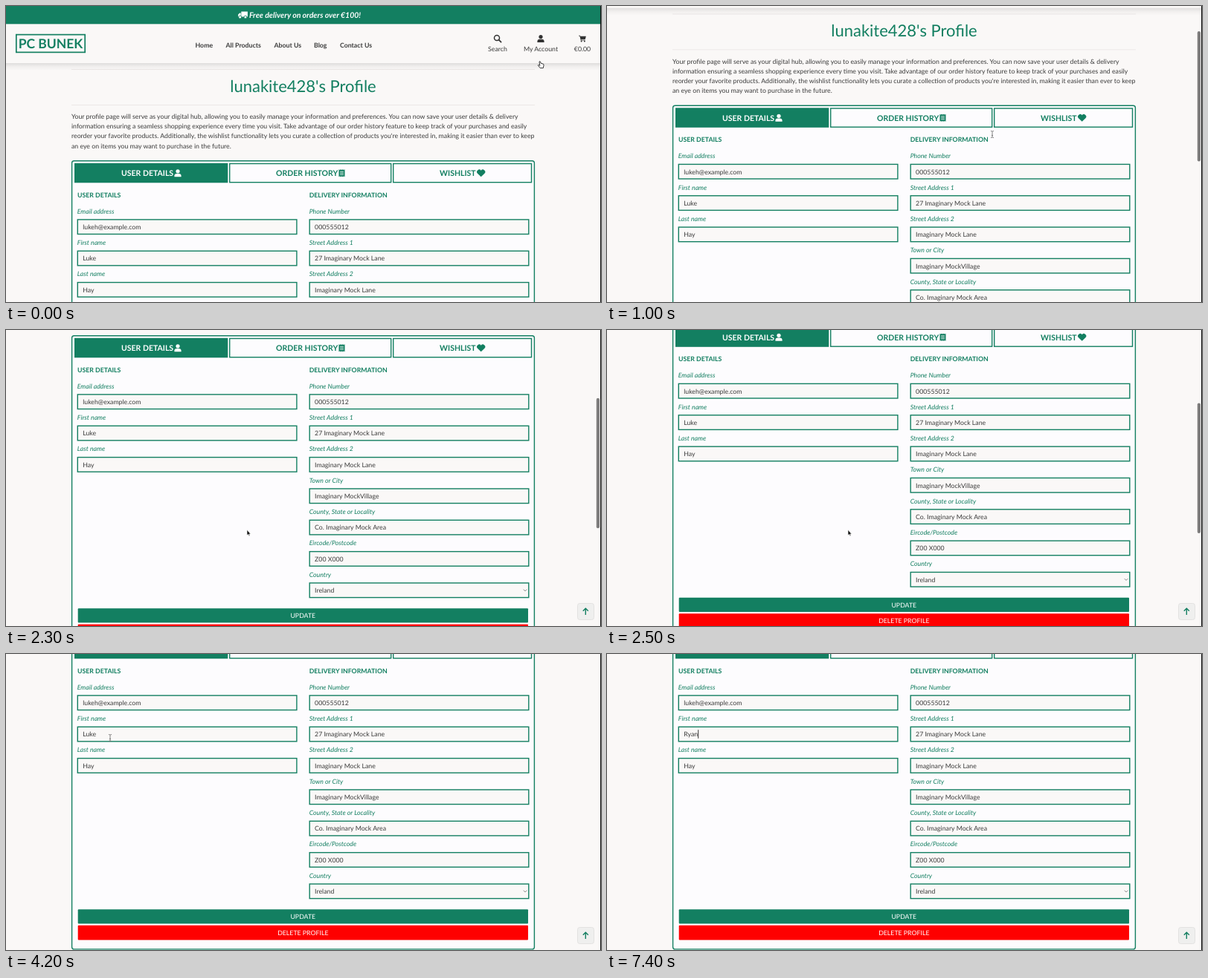
Animation, 800 px wide and 399 px high, one loop 8 s. Source, as an HTML page:

```html
<!DOCTYPE html>
<html lang="en">
<head>
<meta charset="utf-8">
<title>Profile page</title>
<style>
html, body { margin: 0; width: 100%; height: 100%; overflow: hidden; background: #faf8f7; }
svg { display: block; width: 100%; height: 100%; }
text { font-family: Lato, "Open Sans", sans-serif; font-size: 8.75px; fill: #3c3c3c; text-rendering: geometricPrecision; white-space: pre; }
.b { font-weight: 700; }
.i { font-style: italic; }
.g { fill: #137f61; }
.w { fill: #fff; }
.m { text-anchor: middle; }
</style>
</head>
<body>
<svg id="stage" viewBox="0 0 800 399"></svg>
<script>
const GREEN = '#137f61', BG = '#faf8f7', PANEL = '#fdfcfe', BASE = 8.75;

// y is the middle of the capital letters
const text = (x, y, s, cls = '', size = BASE, id = '') =>
  `<text ${id && `id="${id}"`} class="${cls}" x="${x}" y="${y + size * .36}" style="font-size:${size}px">${s}</text>`;
const box = (x, y, w, h, fill, more = '') =>
  `<rect x="${x}" y="${y}" width="${w}" height="${h}" fill="${fill}" ${more}/>`;
const edge = (width, radius = 0) => `stroke="${GREEN}" stroke-width="${width}" rx="${radius}"`;
const at = (x, y, shape, fill = '#333', scale = 1) =>
  `<g transform="translate(${x} ${y}) scale(${scale})" fill="${fill}">${shape}</g>`;

const icon = {
  user: '<circle cy="-2.5" r="2.6"/><path d="M-4.6 5V4A3.3 3.3 0 0 1-1.3.7H1.3A3.3 3.3 0 0 1 4.6 4V5Z"/>',
  search: '<path d="M1.6 1.6L4.6 4.6" stroke="#333" stroke-width="1.7" stroke-linecap="round"/><circle cx="-1" cy="-1" r="3.5" fill="none" stroke="#333" stroke-width="1.5"/>',
  cart: '<path d="M-5.5-4.8H-3.4L-3-3.6H5.4L4.2 1H-1.8L-1.6 1.9H4V2.8H-2.4L-4-3.8H-5.5Z"/><circle cx="-1.5" cy="4" r="1.1"/><circle cx="3.2" cy="4" r="1.1"/>',
  heart: '<path d="M0 4.6L-4.5 .2A2.75 2.75 0 0 1 0-3.2A2.75 2.75 0 0 1 4.5 .2Z"/>',
  list: '<path d="M-4-5L-2.7-4.3L-1.3-5L0-4.3L1.3-5L2.7-4.3L4-5V5L2.7 4.3L1.3 5L0 4.3L-1.3 5L-2.7 4.3L-4 5Z"/><path d="M-2.4-2H2.4M-2.4 0H2.4M-2.4 2H2.4" stroke="#fff" stroke-width=".8"/>',
  truck: '<path d="M-2.2-4.6H6.4V2.6H-2.2ZM-2.8-2.6V2.6H-6.4V-.4L-4.4-2.6Z"/><g stroke="#137f61" stroke-width=".8"><circle cx="-3.8" cy="3" r="1.9"/><circle cx="3.4" cy="3" r="1.9"/></g>'
};

const field = (x, label, y, value, id) =>
  text(x, y, label, 'i g') +
  box(x + .5, y + 11.4, 294.6, 19.6, BG, edge(1.4)) +
  text(x + 7.4, y + 21.4, value, '', BASE, id);

function header() {
  const nav = [[254.5, 'Home'], [295.5, 'All Products'], [360.5, 'About Us'], [414, 'Blog'], [449, 'Contact Us']];
  return box(0, 77, 799, 10, 'url(#shade)') + box(0, 24, 799, 53, BG) + box(0, -2, 799, 26.3, GREEN) +
    at(318.5, 12, icon.truck, '#fff') +
    text(327, 12, 'Free delivery on orders over €100!', 'b i w', 10.5) +
    box(13.8, 38.6, 92.4, 23.8, 'none', edge(1.7)) +
    text(60, 50.5, 'PC BUNEK', 'b g m', 17.5) +
    nav.map(([x, s]) => text(x, 53, s, 'b')).join('') +
    at(661, 44, icon.search) + at(719, 44, icon.user) + at(775, 44, icon.cart, '#333', .9) +
    text(661, 57.5, 'Search', 'm') + text(719, 57.5, 'My Account', 'm') + text(775, 57.5, '€0.00', 'm');
}

function page() {
  const intro = [
    'Your profile page will serve as your digital hub, allowing you to easily manage your information and preferences. You can now save your user details &amp; delivery',
    'information ensuring a seamless shopping experience every time you visit. Take advantage of our order history feature to keep track of your purchases and easily',
    "reorder your favorite products. Additionally, the wishlist functionality lets you curate a collection of products you're interested in, making it easier than ever to keep",
    'an eye on items you may want to purchase in the future.'];
  const left = [['Email address', 'lukeh@example.com'], ['First name', 'Luke', 'first'], ['Last name', 'Hay']];
  const right = [['Phone Number', '000555012'], ['Street Address 1', '27 Imaginary Mock Lane'],
    ['Street Address 2', 'Imaginary Mock Lane'], ['Town or City', 'Imaginary MockVillage'],
    ['County, State or Locality', 'Co. Imaginary Mock Area'], ['Eircode/Postcode', 'Z00 X000'], ['Country', 'Ireland']];
  const column = (x, rows) => rows.map(([l, v, id], i) => field(x, l, 276.5 + 42.35 * i, v, id)).join('');
  return box(88, 85, 623, .8, '#e9e5e3') + box(88, 133, 623, .8, '#e9e5e3') + header() +
    text(399.5, 108, "lunakite428's Profile", 'g m', 22) +
    intro.map((s, i) => text(88, 149 + 13.12 * i, s)).join('') +
    box(88.6, 208.7, 621.8, 421.2, PANEL, edge(1.4, 3)) +
    box(92, 211.8, 206.3, 26.5, GREEN) +
    box(300.7, 212.5, 217, 25.2, PANEL, edge(1.4)) +
    box(520.7, 212.5, 185.8, 25.2, PANEL, edge(1.4)) +
    text(155, 225.3, 'USER DETAILS', 'b w', 10.5) + at(231, 225.3, icon.user, '#fff') +
    text(363, 225.3, 'ORDER HISTORY', 'b g', 10.5) + at(451.5, 225.3, icon.list, GREEN) +
    text(583, 225.3, 'WISHLIST', 'b g', 10.5) + at(638.7, 225.3, icon.heart, GREEN, 1.1) +
    text(96, 254.6, 'USER DETAILS', 'b g') + text(407.7, 254.6, 'DELIVERY INFORMATION', 'b g') +
    column(95.8, left) + column(407.7, right) +
    '<path d="M695.8 550.7L698 552.9L700.2 550.7" fill="none" stroke="#777" stroke-width=".9"/>' +
    box(96.7, 576.2, 605.3, 19.4, GREEN, 'rx="1"') + text(399.3, 586, 'UPDATE', 'w m') +
    box(96.7, 597.8, 605.3, 19.6, '#fe0000', 'rx="1"') + text(399.3, 607.8, 'DELETE PROFILE', 'w m') +
    box(0, 334.2, .9, 11.6, '#222', 'id="caret"');
}

const pointers = `
  <path id="hand" d="M-2-4Q-1-5-.4-3.8L.3-1.6L3 -1Q4.3-.6 4 .9L3.3 4.6H-.8L-3.6 1.2Q-3.6 0-2.4 .6L-1.2 1.4Z" fill="#fff" stroke="#222" stroke-width=".9"/>
  <path id="arrow" d="M0-2.6V4.8L1.7 3.3L2.8 5.8L4 5.3L2.9 2.9H5Z" fill="#111" stroke="#fff" stroke-width=".6"/>
  <path id="beam" d="M-2-4.5Q0-4.5 0-3.6Q0-4.5 2-4.5M0-3.6V3.6M-2 4.5Q0 4.5 0 3.6Q0 4.5 2 4.5M-1 1.4H1" fill="none" stroke="#666" stroke-width=".8"/>`;

const stage = document.getElementById('stage');
stage.innerHTML = `<defs><linearGradient id="shade" x2="0" y2="1">
  <stop stop-color="#000" stop-opacity=".11"/><stop offset=".45" stop-color="#000" stop-opacity=".04"/><stop offset="1" stop-color="#000" stop-opacity="0"/>
  </linearGradient></defs>` +
  box(0, 0, 800, 399, BG) + `<g id="page">${page()}</g>` +
  `<g id="up">${box(768.5, 368.5, 22, 22, '#efefee', 'rx="3" stroke="#e3e2e1"')}
  <path d="M779.3 384V375.4M775.8 378.8L779.3 375.3L782.8 378.8" fill="none" stroke="${GREEN}" stroke-width="1.4"/></g>` +
  box(793.8, 0, 4.2, 175.5, '#7e7d7d', 'id="thumb" rx="2.1"') + box(799, 0, 1, 399, '#111') +
  `<g id="pointer">${pointers}</g>`;

const [pageEl, up, thumb, pointer, first, caret] =
  ['page', 'up', 'thumb', 'pointer', 'first', 'caret'].map(id => document.getElementById(id));
const shapes = ['hand', 'arrow', 'beam'].map(id => document.getElementById(id));

const scrolls = [[0, 0], [600, 0], [700, 5], [800, 20], [900, 46], [1000, 74.5], [1100, 101], [1200, 123], [1300, 138],
  [1400, 144.5], [1900, 144.5], [2000, 151], [2200, 189], [2400, 213], [2500, 215.5], [2700, 215.5], [2900, 225], [3100, 232]];
const pointerX = [[0, 719], [600, 518], [1500, 518], [2000, 324], [3400, 324], [4200, 140]];
const pointerY = [[0, 79], [600, 173], [1500, 173], [2000, 272], [3400, 272], [4200, 113]];
const thumbFade = [[500, 0], [700, 1], [3500, 1], [3900, 0]];
const kinds = [[0, 'hand'], [200, 'arrow'], [500, 'beam'], [1700, 'arrow'], [4100, 'beam'], [6200, '']];
const typing = [[0, 'Luke', 0], [4400, 'Luke', 1], [4900, 'Luke', 0], [5400, 'Luk', 1], [5600, 'Lu', 1], [5800, 'L', 1],
  [6200, '', 0], [6400, '', 1], [6800, 'R', 1], [7000, 'Ry', 1], [7200, 'Rya', 1], [7400, 'Ryan', 1]];

const step = (rows, t) => rows.filter(r => r[0] <= t).pop();
const linear = p => p;
const smooth = p => p * p * (3 - 2 * p);
function tween(rows, t, ease) {
  const n = rows.findIndex(r => r[0] > t);
  if (n < 0) return rows[rows.length - 1][1];
  if (n === 0) return rows[0][1];
  const [t0, a] = rows[n - 1], [t1, b] = rows[n];
  return a + (b - a) * ease((t - t0) / (t1 - t0));
}

function draw(t) {
  const y = tween(scrolls, t, linear);
  pageEl.setAttribute('transform', `translate(0 ${-y})`);
  up.style.display = y > 109 ? '' : 'none';
  thumb.setAttribute('y', y * .457);
  thumb.style.opacity = tween(thumbFade, t, linear);
  pointer.setAttribute('transform', `translate(${tween(pointerX, t, smooth)} ${tween(pointerY, t, smooth)})`);
  const kind = step(kinds, t)[1];
  shapes.forEach(s => { s.style.display = s.id === kind ? '' : 'none'; });
  const [, name, shown] = step(typing, t);
  first.textContent = name;
  caret.style.display = shown ? '' : 'none';
  caret.setAttribute('x', 103.3 + (name ? first.getComputedTextLength() : 0));
}

const LOOP = 8000, TICK = 100;
const start = performance.now();
function run() {
  const t = (performance.now() - start) % LOOP;
  draw(Math.floor(t / TICK) * TICK);
  requestAnimationFrame(run);
}
run();
</script>
</body>
</html>
```
